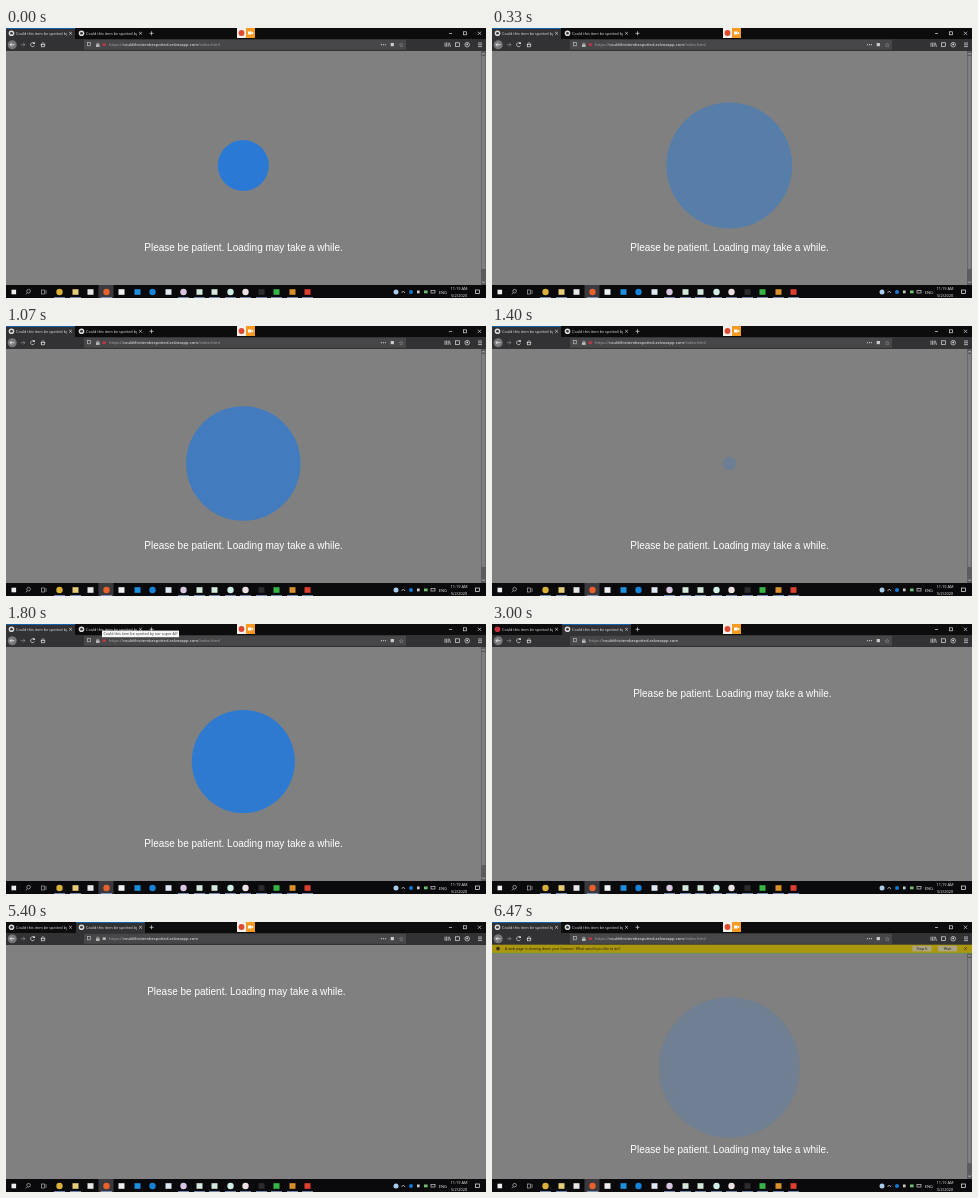
Animation, 480 px wide and 270 px high, one loop 6.54 s. Source, as an HTML page with a canvas:

```html
<!DOCTYPE html>
<html lang="en">
<head>
<meta charset="utf-8">
<title>Loading pulse</title>
<style>
  html, body { margin: 0; width: 100%; height: 100%; overflow: hidden; background: #808080; }
  canvas { display: block; width: 480px; height: 270px; }
</style>
</head>
<body>
<canvas id="stage" width="480" height="270"></canvas>
<script>
const ctx = document.getElementById('stage').getContext('2d');
const LOOP = 6540, STEP = 1000 / 15;
const UI = '"Open Sans", sans-serif', ARIAL = '"Liberation Sans", Arial, sans-serif';
const SITE = 'couldthisitembespotted.zelvoxapp.com';
const TITLE = 'Could this item be spotted by our super AI?';

function box(color, x, y, w, h) {
  ctx.fillStyle = color;
  ctx.fillRect(x, y, w, h);
}

function dot(color, x, y, r) {
  ctx.fillStyle = color;
  ctx.beginPath();
  ctx.arc(x, y, r, 0, 7);
  ctx.fill();
}

function ring(color, x, y, r, from = 0, to = 7) {
  ctx.strokeStyle = color;
  ctx.beginPath();
  ctx.arc(x, y, r, from, to);
  ctx.stroke();
}

function line(color, ...points) {
  ctx.strokeStyle = color;
  ctx.beginPath();
  for (let i = 0; i < points.length; i += 2) ctx.lineTo(points[i], points[i + 1]);
  ctx.stroke();
}

function frame(color, x, y, w, h) {
  ctx.strokeStyle = color;
  ctx.strokeRect(x, y, w, h);
}

// Returns the x where the text ends.
function text(str, x, y, size, color, { align = 'left', weight = 400, font = UI } = {}) {
  ctx.font = `${weight} ${size}px ${font}`;
  ctx.textAlign = align;
  ctx.fillStyle = color;
  ctx.fillText(str, x, y);
  return x + ctx.measureText(str).width;
}

function cross(x, y, r, color = '#ddd') {
  line(color, x - r, y - r, x + r, y + r);
  line(color, x - r, y + r, x + r, y - r);
}

function message(x, y) {
  text('Please be patient. Loading may take a while.', x, y, 10, '#fff', { align: 'center', font: ARIAL });
}

function pulse(phase, y) {
  ctx.globalAlpha = 0.82 * Math.sin(Math.PI * phase) ** 2;
  dot('#0078ff', 237.3, y, Math.max(0, 88 * (phase - 0.07)));
  ctx.globalAlpha = 1;
}

function tab(x, active, recording) {
  box(active ? '#323234' : '#0c0c0d', x, 0, 69, 11);
  if (active) box('#0a6cc8', x, 0, 69, 0.8);
  dot(recording ? '#c8323c' : '#ddd', x + 5.5, 5.3, 2.8);
  if (!recording) dot('#333', x + 5.5, 5.3, 1.3);
  ctx.save();
  ctx.beginPath();
  ctx.rect(x + 10, 1, 51, 10);
  ctx.clip();
  text(TITLE, x + 10, 6.9, 3.8, '#e4e4e6');
  ctx.restore();
  cross(x + 64.5, 5.3, 1.3);
}

function browser(first, recording, indicator) {
  box('#0c0c0d', 0, 0, 480, 11);
  tab(0, first, recording);
  tab(70, !first, false);
  line('#ddd', 143.5, 5.3, 147.5, 5.3);
  line('#ddd', 145.5, 3.3, 145.5, 7.3);
  box('#f4f0ec', 231, 0, 9, 10);
  dot('#dc4a30', 235.5, 5, 2.9);
  box('#f59a23', 240, 0, 9, 10);
  box('#fff', 242, 3.5, 3.6, 3);
  box('#fff', 246, 4, 1.2, 2);
  line('#ddd', 443, 5.5, 446, 5.5);
  frame('#ddd', 457.5, 3.8, 3, 3);
  cross(473.5, 5.3, 1.6);

  box('#323234', 0, 11, 480, 12);
  dot('#77777a', 6.2, 16.7, 4.5);
  line('#fff', 8.4, 16.7, 4, 16.7);
  line('#fff', 5.8, 14.9, 4, 16.7, 5.8, 18.5);
  line('#8b8b8e', 14.8, 16.7, 19, 16.7, 17.2, 14.9);
  line('#8b8b8e', 19, 16.7, 17.2, 18.5);
  ring('#ddd', 26.6, 16.7, 2, 0.4, 5.7);
  box('#ddd', 27.2, 14.3, 1.7, 1.7);
  line('#ddd', 34.6, 16.8, 37, 14.5, 39.4, 16.8);
  frame('#ddd', 35.6, 16.6, 2.8, 2.2);
  box('#474749', 78, 11.8, 322, 10);
  frame('#bbb', 81.5, 14.6, 2.8, 3.2);
  box('#bbb', 90, 16.3, 3.6, 2.6);
  ring('#bbb', 91.8, 16.2, 1.2, Math.PI, 0);
  if (indicator) box(first ? '#c93348' : '#bbb', 96.6, 15.4, 3.2, 2.5);
  let x = text('https://', indicator ? 103 : 97, 18.2, 4.1, '#aaa');
  x = text(SITE, x, 18.2, 4.1, '#f5f5f7');
  if (first) text('/index.html', x, 18.2, 4.1, '#aaa');
  for (const dx of [0, 2, 4]) dot('#ccc', 375.4 + dx, 16.7, 0.6);
  box('#ccc', 384.7, 15, 3.2, 3.2);
  text('☆', 395.3, 18.8, 6, '#ddd', { align: 'center', font: '"DejaVu Sans", sans-serif' });
  for (const dx of [0, 1.6, 3.2]) line('#ddd', 439 + dx, 14.6, 439 + dx, 18.8);
  line('#ddd', 443.4, 14.8, 444.4, 18.8);
  frame('#ddd', 449.5, 14.8, 4, 3.8);
  ring('#ddd', 461.2, 16.7, 2.3);
  dot('#ddd', 461.2, 16.4, 0.9);
  for (const dy of [15, 16.8, 18.6]) line('#ddd', 472, dy, 476, dy);
}

const APPS = [
  ['#d9b13a', 53, 'dot', 1], ['#e8cd78', 69, 'box', 1], ['#e6e6e6', 84, 'box'],
  ['#e8602c', 100, 'dot', 1], ['#f0f0f0', 115, 'box'], ['#1c8fe0', 131, 'box'],
  ['#1683d8', 146, 'dot'], ['#dfe8f2', 162, 'box'], ['#d9c6e2', 177, 'dot', 1],
  ['#d4e8dc', 193, 'box', 1], ['#d4e8dc', 208, 'box', 1], ['#cfeee6', 224, 'dot', 1],
  ['#ece2e4', 239, 'dot', 1], ['#2c2c2e', 255, 'box', 1], ['#35b545', 270, 'box', 1],
  ['#d98f2b', 286, 'box', 1], ['#dc3f30', 301, 'box', 1]
];

function taskbar() {
  box('#0a0a0c', 0, 257, 480, 13);
  box('#eee', 5.5, 261.7, 4.6, 4.6);
  ring('#bbb', 22.6, 263.2, 1.8);
  line('#bbb', 21.4, 264.6, 19.8, 266.4);
  frame('#aaa', 35.5, 262, 3, 4);
  line('#aaa', 40, 262, 40, 266);
  box('#3a3a3e', 92.5, 257, 15, 13);
  for (const [color, x, shape, running] of APPS) {
    if (shape === 'dot') dot(color, x + 0.5, 264, 3.2);
    else box(color, x - 2.5, 261.2, 6, 5.6);
    if (running) box('#8ea3d4', x - 5, 269.2, 11, 0.8);
  }
  dot('#a9cbea', 390, 264, 2.5);
  line('#ddd', 395.5, 265, 397.3, 263, 399, 265);
  dot('#1479d4', 405, 264, 2);
  box('#ccc', 411, 262.5, 2.6, 2.8);
  box('#6fbf73', 418, 262.5, 3.6, 2.8);
  frame('#ccc', 425, 262.5, 4, 2.5);
  text('ENG', 436.8, 265.6, 4, '#eee', { align: 'center' });
  text('11:19 AM', 453, 262.4, 3.9, '#eee', { align: 'center' });
  text('5/2/2020', 453, 268.6, 3.9, '#eee', { align: 'center' });
  frame('#eee', 469.5, 262, 4, 3.4);
}

function scrollbar(top) {
  box('#5c5c5e', 475, top, 5, 257 - top);
  box('#7e7e80', 475.6, top + 5, 3.8, 236 - top);
  line('#ddd', 476.2, top + 3.5, 477.5, top + 2, 478.8, top + 3.5);
  line('#ddd', 476.2, 253.5, 477.5, 255, 478.8, 253.5);
}

function permissionPopup() {
  box('#4a4a4f', 93, 23, 114, 56);
  frame('#3a3a3e', 93, 23, 114, 56);
  box('#9a9a9e', 97, 27, 6, 6.5);
  box('#9a9a9e', 103.6, 28.5, 2, 3.6);
  text('Will you allow', 111, 29.4, 4.1, '#f5f5f5');
  const x = text(SITE, 111, 34.6, 3.65, '#fff', { weight: 700 });
  text(' to use your', x, 34.6, 3.8, '#f5f5f5');
  text('camera?', 111, 39.6, 4.1, '#f5f5f5');
  text('Camera to share:', 111, 48.2, 4, '#f5f5f5');
  box('#e6e6e6', 111, 50.3, 91, 5.4);
  text('QV Broad Scene XR Webcam', 112.5, 54.5, 3.7, '#222');
  box('#fff', 112, 57.6, 4, 4);
  text('Remember this decision', 117.5, 61.2, 3.8, '#f5f5f5');
  box('#0a63e6', 93, 66, 57, 13);
  text('Allow', 121.5, 73.8, 4.2, '#fff', { align: 'center' });
  box('#5b5b60', 150, 66, 57, 13);
  text("Don't Allow", 178, 73.8, 4.2, '#f5f5f5', { align: 'center' });
}

function slowPageBar() {
  box('#ab960f', 0, 22.7, 480, 8.3);
  box('#5f9a4a', 0, 30.8, 480, 0.8);
  dot('#3a3208', 6, 26.6, 1.9);
  text('A web page is slowing down your browser. What would you like to do?', 13, 28, 3.55, '#1d1a08');
  for (const [label, x] of [['Stop It', 420.5], ['Wait', 446]]) {
    box('#aca585', x, 23.8, 19, 5.6);
    text(label, x + 9.5, 28, 3.7, '#1d1a08', { align: 'center' });
  }
  cross(473.5, 26.6, 1.3, '#3a3208');
}

function tooltip() {
  box('#f6f6f6', 96, 6.6, 77, 6.6);
  text(TITLE, 97.5, 11.4, 3.7, '#333');
}

function draw(time) {
  const step = Math.floor(time / STEP + 0.08);
  const slow = step >= 97;
  const first = step < 29 || slow;
  const asking = step >= 56 && step < 69;

  ctx.lineWidth = 0.7;
  box('#808080', 0, 0, 480, 270);
  if (first) {
    const shift = slow ? 8 : 0;
    pulse(slow ? 0.87 : (0.36 + step * STEP / 784) % 1, 137.5 + shift);
    message(237.5, 222.8 + shift);
    scrollbar(23 + shift);
  } else {
    message(240.4, 72.6);
  }
  browser(first, !first && step < 56, first || step >= 56);
  if (slow) slowPageBar();
  if (step >= 25 && step < 29) tooltip();
  if (asking) permissionPopup();
  taskbar();
}

function tick() {
  draw(performance.now() % LOOP);
  requestAnimationFrame(tick);
}
tick();
</script>
</body>
</html>
```
